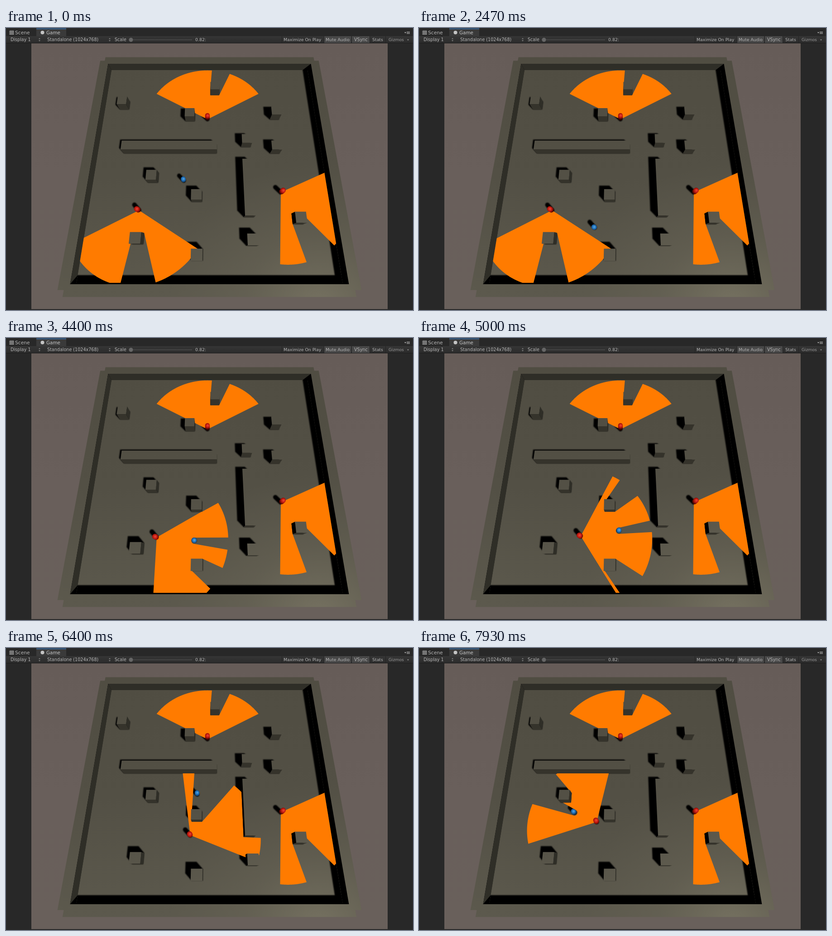
Write an HTML page with a canvas that moves like this. It is 899 px wide and 623 px high and loops after 8000 ms.

```html
<!DOCTYPE html>
<html lang="en">
<head>
<meta charset="utf-8">
<title>Field of view</title>
<style>
  html, body { margin: 0; width: 100%; height: 100%; overflow: hidden; background: #282828; }
  canvas { display: block; width: 100%; height: 100%; }
</style>
</head>
<body>
<canvas id="stage" width="899" height="623"></canvas>
<script>
const ctx = document.getElementById('stage').getContext('2d');
const LOOP = 8000, TICK = 1000 / 15;
const RANGE = 0.577, HALF_VIEW = Math.PI / 3;
const HEIGHT = 0.083, SIDE = 0.087;
const SHADOW = { x: -0.05, z: 0.054 };
const CAMERA_Z = 0.21;
const DARK = '#2f2e27', ORANGE = '#ff7b00';
const RED = ['#f04838', '#bd160c', '#2c0200'];
const BLUE = ['#58acea', '#1b68b0', '#041a34'];

// Ground plane: x from -1 to 1, z from 0 (near) to 2 (far), h is height.
function project(x, z, h = 0) {
  const s = 1 + 0.179 * z - 0.546 * h;
  return [449.5 + 294 * x / s, (563 - 218.4 * z - 272 * h) / s];
}
function unproject(px, py, h) {
  const near = 1 - 0.546 * h;
  const z = (563 - 272 * h - py * near) / (218.4 + 0.179 * py);
  return [(px - 449.5) * (near + 0.179 * z) / 294, z];
}
const scaleAt = (z, h) => 294 / (1 + 0.179 * z - 0.546 * h);

// Screen centre of each top face, then ground width and depth.
const makeBox = (px, py, w = SIDE, d = SIDE) => {
  const [x, z] = unproject(px, py, HEIGHT);
  return { l: x - w / 2, r: x + w / 2, f: z - d / 2, b: z + d / 2 };
};
const boxes = [
  ...[[256, 159.5], [405.5, 186], [461.5, 127.5], [597, 182], [532, 244], [598, 258.5],
    [320.5, 324], [420.5, 367.5], [285, 463.5], [421, 501], [546, 467], [652, 418]]
    .map(p => makeBox(...p)),
  makeBox(360, 258.5, 0.83, 0.085),
  makeBox(536.4, 349, 0.085, 0.485)
];

const watchers = [
  { x: -0.019, z: 1.419, turn: 90 },
  { x: 0.6035, z: 0.7055, turn: -36 }
];
// Waypoints: time, x, z and, for the hunter, heading in degrees.
const playerPath = [
  [670, -0.221, 0.81], [2470, -0.2246, 0.41], [3100, -0.25, 0.235], [3670, -0.238, 0.284],
  [4400, -0.121, 0.386], [5600, 0.025, 0.572], [6400, -0.106, 0.866], [6900, -0.23, 0.93],
  [7930, -0.406, 0.702]
];
const hunterPath = [
  [2400, -0.582, 0.552, -92], [3670, -0.512, 0.476, -47.5], [4400, -0.426, 0.412, -29.4],
  [4930, -0.348, 0.42, 2], [5600, -0.247, 0.447, 14.4], [6400, -0.158, 0.511, 38.3],
  [6800, -0.125, 0.55, 50], [7930, -0.2155, 0.622, 138.3]
];

// Smooth curve through the waypoints, starting from rest.
function follow(path, t) {
  const last = path.length - 1;
  const at = Math.min(Math.max(t, path[0][0]), path[last][0]);
  const i = Math.min(path.findLastIndex(p => p[0] <= at), last - 1);
  const a = path[i], b = path[i + 1], span = b[0] - a[0], u = (at - a[0]) / span;
  const slope = (k, n) => {
    if (k === 0) return 0;
    const p = path[k - 1], q = path[Math.min(k + 1, last)];
    return span * (q[n] - p[n]) / (q[0] - p[0]);
  };
  const ease = u * u * (3 - 2 * u);
  return a.map((v, n) => v + (b[n] - v) * ease
    + slope(i, n) * u * (1 - u) ** 2 - slope(i + 1, n) * u * u * (1 - u));
}

function trace(points) {
  ctx.beginPath();
  points.forEach(p => ctx.lineTo(p[0], p[1]));
  ctx.closePath();
}
function poly(points, fill) {
  trace(points);
  ctx.fillStyle = fill;
  ctx.fill();
}
const ground = points => points.map(p => project(...p));
const slab = (l, r, f, b, h) => ground([[l, f, h], [r, f, h], [r, b, h], [l, b, h]]);

function gradient(g, ...colors) {
  colors.forEach((c, i) => g.addColorStop(i / (colors.length - 1), c));
  return g;
}
const light = gradient(ctx.createLinearGradient(0, 64, 0, 595), '#504d42', '#535045', '#5c594d');
const glow = gradient(ctx.createRadialGradient(690, 620, 0, 690, 620, 330),
  'rgba(140,135,114,.55)', 'rgba(125,120,102,.2)', 'rgba(120,115,98,0)');
const sky = gradient(ctx.createLinearGradient(0, 34, 0, 621), '#665c58', '#695f5b', '#69605b');
const bar = gradient(ctx.createLinearGradient(0, 18, 0, 33), '#363636', '#2b2b2b');

function litPoly(points) {
  poly(points, light);
  poly(points, glow);
}

function boxHit(b, x, z, dx, dz) {
  const x1 = (b.l - x) / dx, x2 = (b.r - x) / dx;
  const z1 = (b.f - z) / dz, z2 = (b.b - z) / dz;
  const enter = Math.max(Math.min(x1, x2), Math.min(z1, z2));
  const leave = Math.min(Math.max(x1, x2), Math.max(z1, z2));
  return enter > 0 && enter < leave ? enter : Infinity;
}
function discHit(c, radius, x, z, dx, dz) {
  const ox = c.x - x, oz = c.z - z;
  const along = ox * dx + oz * dz;
  const off = radius * radius - (ox * ox + oz * oz - along * along);
  return along > 0 && off > 0 ? along - Math.sqrt(off) : Infinity;
}
const wallHit = (x, z, dx, dz) =>
  Math.min((Math.sign(dx) - x) / dx, ((dz > 0 ? 2 : 0) - z) / dz);

function drawView({ x, z, turn }, player) {
  const points = [project(x, z)], rays = 700;
  for (let i = 0; i <= rays; i++) {
    const angle = turn * Math.PI / 180 + HALF_VIEW * (1 - 2 * i / rays) + 1e-6;
    const dx = Math.cos(angle), dz = Math.sin(angle);
    const d = Math.min(RANGE, wallHit(x, z, dx, dz), discHit(player, 0.025, x, z, dx, dz),
      ...boxes.map(b => boxHit(b, x, z, dx, dz)));
    points.push(project(x + dx * d, z + dz * d));
  }
  poly(points, ORANGE);
}

const floor = slab(-1, 1, 0, 2, 0);

function drawArena() {
  const edge = 1.083, inset = 1.038;
  litPoly(slab(-inset, inset, 1 - edge, 1 + edge, HEIGHT));
  litPoly(slab(-edge, edge, 1 - inset, 1 + inset, HEIGHT));
  poly(slab(-1, 1, 0, 2, HEIGHT), '#000');
  poly(ground([[-1, 2, HEIGHT], [1, 2, HEIGHT], [1 + SHADOW.x, 2], [-1, 2]]), DARK);
  poly(ground([[-1, 2, HEIGHT], [-1, 2], [-1, SHADOW.z], [-1, 0, HEIGHT]]), DARK);
  litPoly(floor);
}

function drawShadows(actors) {
  const { x: sx, z: sz } = SHADOW;
  ctx.save();
  trace(floor);
  ctx.clip();
  ctx.filter = 'blur(1.2px)';
  poly(slab(1 + sx, 1.1, -0.1, 2.1), '#000');
  poly(slab(-1.1, 1.1, -0.1, sz), '#000');
  for (const { l, r, f, b } of boxes) {
    poly(ground([[r, f], [l, f], [l + sx, f + sz], [l + sx, b + sz], [r + sx, b + sz], [r, b]]),
      '#000');
  }
  ctx.strokeStyle = '#000';
  ctx.lineCap = 'round';
  for (const { x, z, r } of actors) {
    ctx.lineWidth = 1.75 * r * scaleAt(z, 0);
    ctx.beginPath();
    ctx.moveTo(...project(x, z));
    ctx.lineTo(...project(x + sx * 0.85, z + sz * 0.85));
    ctx.stroke();
  }
  ctx.restore();
}

function drawBox({ l, r, f, b }) {
  const face = (x1, z1, x2, z2, fill) =>
    poly(ground([[x1, z1], [x2, z2], [x2, z2, HEIGHT], [x1, z1, HEIGHT]]), fill);
  if (l > 0) face(l, f, l, b, '#000');
  if (r < 0) face(r, f, r, b, DARK);
  if (b < CAMERA_Z) face(l, b, r, b, '#000');
  if (f > CAMERA_Z) face(l, f, r, f, '#35332b');
  litPoly(slab(l, r, f, b, HEIGHT));
}

function drawActor({ x, z, r, top, colors }) {
  const foot = project(x, z, r), head = project(x, z, top);
  const size = r * scaleAt(z, 0.05);
  ctx.strokeStyle = gradient(
    ctx.createRadialGradient(head[0] + 1, head[1], 0, head[0], head[1] + 1, size * 1.6), ...colors);
  ctx.lineCap = 'round';
  ctx.lineWidth = size * 2;
  ctx.beginPath();
  ctx.moveTo(...foot);
  ctx.lineTo(...head);
  ctx.stroke();
}

function label(text, x, y = 29, size = 9.4, fill = '#b8b8b8') {
  ctx.font = size + 'px "DejaVu Sans", sans-serif';
  ctx.fillStyle = fill;
  ctx.fillText(text, x, y);
}
function rect(x, y, w, h, fill) {
  ctx.fillStyle = fill;
  ctx.fillRect(x, y, w, h);
}
function disc(x, y, r, fill) {
  ctx.beginPath();
  ctx.arc(x, y, r, 0, 7);
  ctx.fillStyle = fill;
  ctx.fill();
}
// A small triangle, pointing down for positive h.
const arrow = (x, y, h, fill = '#888') => poly([[x - 2, y], [x + 2, y], [x, y + h]], fill);
function spinner(x) {
  arrow(x, 24.5, -2.5);
  arrow(x, 27, 2.5);
}

function drawToolbar() {
  rect(0, 0, 899, 18, '#282828');
  rect(67, 2, 66, 16, '#3a3a3a');
  rect(67, 1, 66, 1.5, '#3a72b0');
  rect(0, 18, 899, 15, bar);
  rect(0, 33, 899, 1, '#1e1e1e');
  rect(703, 18, 59, 15, '#484848');
  rect(764, 18, 39, 15, '#484848');
  for (const x of [609, 702, 763, 803, 838]) rect(x, 18, 1, 15, '#242424');

  for (const n of [9, 12, 15]) {
    rect(n, 5, 1, 10, '#b0b0b0');
    rect(7, n - 2, 11, 1, '#b0b0b0');
  }
  disc(80.5, 10, 4, '#c4c4c4');
  label('Scene', 20, 14, 10.7);
  label('Game', 89, 14, 10.4, '#c8c8c8');
  arrow(882, 9, 3, '#aaa');
  for (const y of [8, 10, 12]) rect(885, y, 7, 1, '#aaa');

  label('Display 1', 10, 29, 9.6);
  spinner(74);
  label('Standalone (1024x768)', 91, 29, 9.6);
  spinner(229);
  label('Scale', 240, 29, 9.6);
  rect(271, 25.5, 140, 1.5, '#4c4c4c');
  disc(276, 26, 4.5, '#666');
  label('0.82:', 418);
  label('Maximize On Play', 613);
  label('Mute Audio', 706);
  label('VSync', 769, 29, 9.6);
  label('Stats', 809);
  label('Gizmos', 845, 29, 9.2, '#999');
  arrow(888, 25, 3);
}

function draw(t) {
  const [, px, pz] = follow(playerPath, t);
  const [, x, z, turn] = follow(hunterPath, t);
  const player = { x: px, z: pz, r: 0.02, top: 0.052, colors: BLUE };
  const guards = [...watchers, { x, z, turn }]
    .map(g => ({ ...g, r: 0.0215, top: 0.066, colors: RED }));
  const actors = [...guards, player];

  rect(0, 0, 899, 623, '#282828');
  rect(56, 34, 787, 587, sky);
  drawArena();
  drawShadows(actors);
  guards.forEach(g => drawView(g, player));
  boxes.forEach(drawBox);
  actors.forEach(drawActor);
  drawToolbar();
}

const start = performance.now();
let shown = -1;
function frame() {
  const t = (performance.now() - start) % LOOP;
  const step = Math.floor((t + 4) / TICK);
  if (step !== shown) {
    shown = step;
    draw(step * TICK % LOOP);
  }
  requestAnimationFrame(frame);
}
frame();
</script>
</body>
</html>
```
